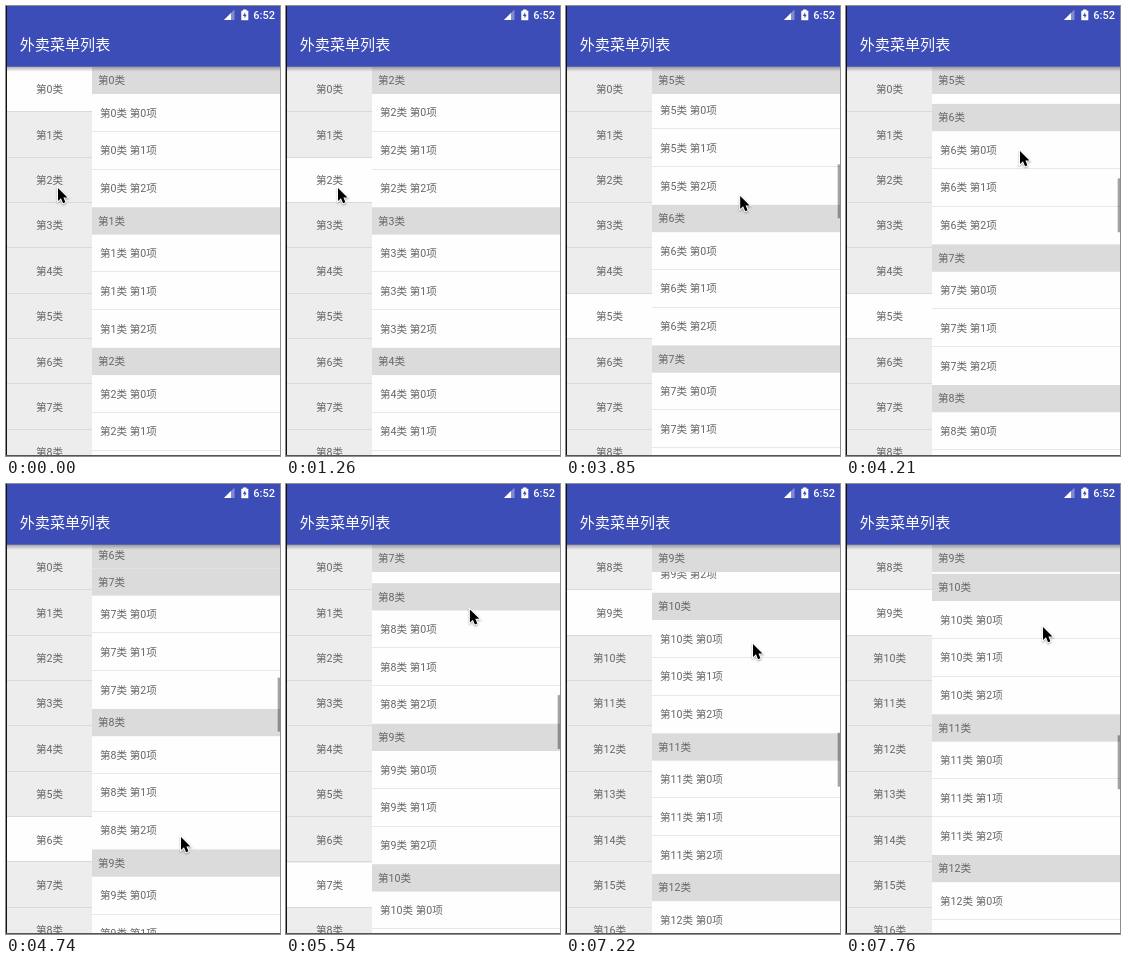
Recreate the animation shown at these times as an HTML page with a canvas. Size 274 by 450 pixels, loop 8 s.

```html
<!DOCTYPE html>
<html lang="zh-CN">
<head>
<meta charset="utf-8">
<title>外卖菜单列表</title>
<style>
html, body { margin: 0; width: 100%; height: 100%; overflow: hidden; background: #fff; }
canvas { display: block; width: 274px; height: 450px; }
</style>
</head>
<body>
<canvas id="stage"></canvas>
<script>
const W = 274, H = 450, LOOP = 8000, STEP = 89.3;
const TOP = 60.7, SPLIT = 86, ROW = 45.4;
const HEAD = 27.3, ITEM = 37.75, SECTION = HEAD + 3 * ITEM, COUNT = 20;
const FONT = 'Roboto, "Noto Sans CJK SC", "Noto Sans CJK", sans-serif';

const canvas = document.getElementById('stage');
const dpr = window.devicePixelRatio || 1;
canvas.width = W * dpr;
canvas.height = H * dpr;
const g = canvas.getContext('2d');
g.scale(dpr, dpr);

// Each leg: first step, last step, where it ends
const POINTER = [
  [18, 26, 50, 309],  // to row 5
  [32, 36, 174, 369], // to the list
  [39, 44, 173, 144], // swipe
  [49, 53, 174, 352], // return
  [54, 63, 184, 96],
  [64, 70, 185, 352],
  [72, 79, 186, 159],
  [82, 87, 196, 142]
];
const SCROLL = [
  [14, 14, 2 * SECTION], // tap on row 2
  [31, 31, 5 * SECTION], // tap on row 5
  [42.4, 53, 960.2],
  [54, 63.6, 1096],
  [72, 82.7, 1376.4]
];

const linear = u => u;
const smooth = u => u * u * (3 - 2 * u);

function travel(legs, start, n, ease) {
  let pos = start;
  for (const [a, b, ...end] of legs) {
    if (n < a) break;
    const u = n >= b ? 1 : ease((n - a) / (b - a));
    pos = pos.map((v, i) => v + (end[i] - v) * u);
  }
  return pos;
}

function rect(x, y, w, h, color) {
  g.fillStyle = color;
  g.fillRect(x, y, w, h);
}

function poly(color, ...pts) {
  g.fillStyle = color;
  g.beginPath();
  for (let i = 0; i < pts.length; i += 2) g.lineTo(pts[i], pts[i + 1]);
  g.closePath();
  g.fill();
}

function text(s, x, y, color = '#666', size = 10.6, weight = 400, align = 'left') {
  g.font = `${weight} ${size}px ${FONT}`;
  g.textAlign = align;
  g.fillStyle = color;
  g.fillText(s, x, y);
}

function drawMenu(selected) {
  const first = selected >= 8 ? 8 : 0;
  rect(0, 60, SPLIT, H - 60, '#ededed');
  for (let i = 0; i < 9; i++) {
    const y = TOP + i * ROW, top = Math.round(y), end = Math.round(y + ROW);
    if (first + i === selected) rect(0, top, SPLIT, end - top, '#fefefe');
    rect(0, end - 1, SPLIT, 1, '#d9d9d9');
    text(`第${first + i}类`, 43.5, Math.floor(y + 26.95), '#666', 10.6, 400, 'center');
  }
}

function drawHead(i, y) {
  rect(SPLIT, y, W - SPLIT, HEAD, '#dbdbdb');
  text(`第${i}类`, 92, Math.round(y + 17.5));
}

function drawList(scroll, selected) {
  g.save();
  g.beginPath();
  g.rect(SPLIT, 60, W - SPLIT, H - 60);
  g.clip();
  rect(SPLIT, 60, W - SPLIT, H - 60, '#fefefe');
  const topOf = i => TOP + i * SECTION - scroll;
  for (let i = selected; i < Math.min(COUNT, selected + 5); i++) {
    for (let j = 0; j < 3; j++) {
      const y = topOf(i) + HEAD + j * ITEM;
      if (j) rect(SPLIT, Math.round(y) - 1, W - SPLIT, 1, '#e8e8e8');
      text(`第${i}类 第${j}项`, 94, Math.round(y + 22.5));
    }
    if (i > selected) drawHead(i, topOf(i));
  }
  // The pinned heading is pushed up by the next one
  const next = topOf(selected + 1);
  drawHead(selected, Math.min(TOP, next - HEAD));
  g.restore();
}

function drawScrollbar(scroll) {
  const view = H - TOP, scale = view / (COUNT * SECTION);
  rect(271.7, TOP + scroll * scale, 2.3, view * scale, 'rgba(0,0,0,.36)');
}

function drawBar() {
  const shade = g.createLinearGradient(0, TOP, 0, TOP + 5);
  shade.addColorStop(0, 'rgba(0,0,0,.3)');
  shade.addColorStop(1, 'rgba(0,0,0,0)');
  rect(0, 60, W, 6, shade);
  rect(0, 0, W, TOP, '#3c4db7');
  text('外卖菜单列表', 13.7, 44, '#fff', 15.1);
  text('6:52', 269, 13, '#fff', 11, 500, 'right');
  // Signal and battery
  poly('rgba(255,255,255,.35)', 218, 14, 228.5, 14, 228.5, 3.5);
  poly('#fff', 218, 14, 225, 14, 225, 7);
  rect(237, 3.5, 3.5, 2, '#fff');
  rect(235.3, 4.7, 7, 9.5, '#fff');
  poly('#3c4db7', 239.2, 6.2, 236.8, 10, 238.5, 10, 238.4, 12.6, 240.8, 8.8, 239.2, 8.8);
}

function drawPointer(x, y) {
  g.save();
  g.translate(x + 1, y + 1);
  g.scale(0.93, 0.93);
  g.beginPath();
  [[0, 0], [0, 14], [3.2, 11], [5.4, 16.3], [8, 15.2], [5.8, 10.1], [10.2, 10.1]]
    .forEach(p => g.lineTo(...p));
  g.closePath();
  g.shadowColor = 'rgba(0,0,0,.35)';
  g.shadowBlur = 2 * dpr;
  g.shadowOffsetY = dpr;
  g.lineWidth = 2;
  g.strokeStyle = '#fff';
  g.stroke();
  g.shadowColor = 'transparent';
  g.fillStyle = '#000';
  g.fill();
  g.restore();
}

function frame(now) {
  const n = Math.floor((now % LOOP) / STEP + 0.15);
  const [scroll] = travel(SCROLL, [0], n, smooth);
  const selected = Math.floor(scroll / SECTION + 1e-6);
  drawMenu(selected);
  drawList(scroll, selected);
  if (n > 42) drawScrollbar(scroll);
  drawBar();
  rect(0, 0, 1, H, '#111');
  rect(0, H - 1, W, 1, '#555');
  drawPointer(...travel(POINTER, [51, 181], n, linear));
  requestAnimationFrame(frame);
}
requestAnimationFrame(frame);
</script>
</body>
</html>
```
